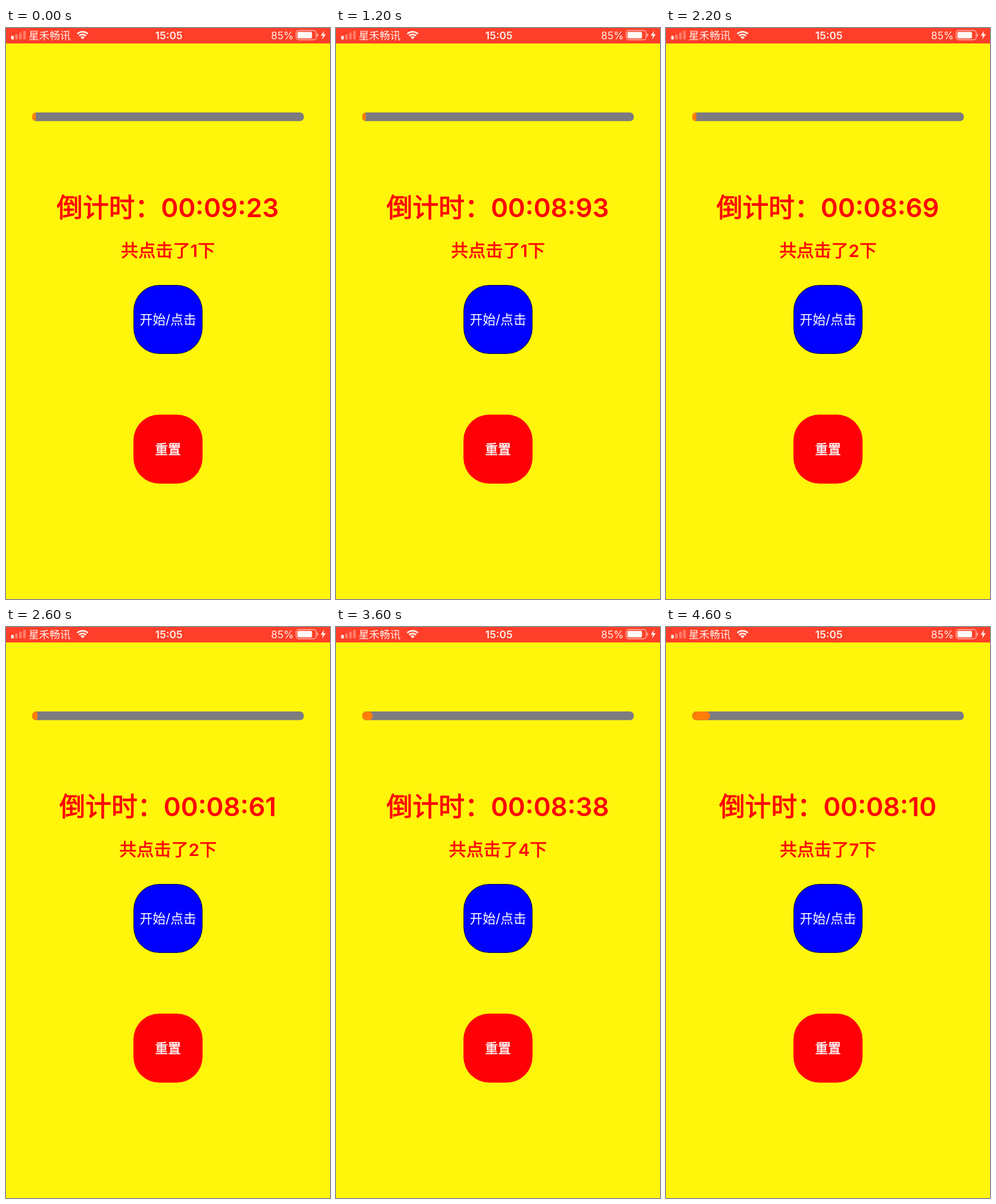
An HTML page with a canvas for the animation above (4800 ms loop, 544x960 px).

```html
<!DOCTYPE html>
<html lang="zh-CN">
<head>
<meta charset="utf-8">
<title>倒计时</title>
<style>
html, body { margin: 0; width: 100%; height: 100%; overflow: hidden; background: #fff60c; }
canvas { display: block; width: 544px; height: 960px; }
</style>
</head>
<body>
<canvas id="stage" width="544" height="960"></canvas>
<script>
const ctx = document.getElementById('stage').getContext('2d');
const LOOP = 4800, STEP = 200;
const CJK = '"Noto Sans CJK SC", "Noto Sans CJK", sans-serif';
const LATIN = 'Inter, sans-serif';
const PALE = '#fff0ea';

// [time, value] knots
const clock = [[0, 923], [600, 906], [1200, 893], [2200, 869], [3000, 853], [4200, 823], [4600, 810]];
const fill = [[0, 6], [2000, 6], [2200, 7], [3000, 11], [4200, 24], [4600, 30]];
const taps = [2000, 2800, 3400, 4000, 4400, 4600];

function lerpAt(knots, t) {
  for (let i = 1; i < knots.length; i++) {
    const [t0, v0] = knots[i - 1], [t1, v1] = knots[i];
    if (t <= t1) return v0 + (v1 - v0) * (t - t0) / (t1 - t0);
  }
  return knots[knots.length - 1][1];
}

function box(x, y, w, h, r, color) {
  ctx.fillStyle = color;
  ctx.beginPath();
  ctx.roundRect(x, y, w, h, r);
  ctx.fill();
}

// bold is an outline width in em, giving a medium weight between the installed ones
const cjk = (text, bold = 0) => ({ text, bold, weight: 400, family: CJK });
const latin = (text, weight = 400) => ({ text, bold: 0, weight, family: LATIN });

// Draws mixed-font runs on one baseline; centred on x unless left is set.
function line(runs, x, y, size, color, left = false) {
  const setFont = r => { ctx.font = `${r.weight} ${size}px ${r.family}`; };
  const widths = runs.map(r => { setFont(r); return ctx.measureText(r.text).width; });
  if (!left) x -= widths.reduce((a, b) => a + b, 0) / 2;
  ctx.fillStyle = ctx.strokeStyle = color;
  ctx.lineJoin = 'round';
  runs.forEach((r, i) => {
    setFont(r);
    ctx.fillText(r.text, x, y);
    if (r.bold) {
      ctx.lineWidth = r.bold * size;
      ctx.strokeText(r.text, x, y);
    }
    x += widths[i];
  });
}

function wifi(x, y) {
  const a = -Math.PI * 0.75, b = -Math.PI * 0.25;
  ctx.strokeStyle = ctx.fillStyle = PALE;
  ctx.lineWidth = 2.8;
  for (const r of [8.2, 12.6]) {
    ctx.beginPath();
    ctx.arc(x, y, r, a, b);
    ctx.stroke();
  }
  ctx.beginPath();
  ctx.moveTo(x, y);
  ctx.arc(x, y, 5, a, b);
  ctx.fill();
}

function battery() {
  ctx.strokeStyle = '#ffb5a6';
  ctx.lineWidth = 1.4;
  ctx.beginPath();
  ctx.roundRect(487.2, 4.3, 33.6, 15.4, 4);
  ctx.stroke();
  box(489.3, 6.4, 24.5, 11.2, 2, '#fffaf6');
  box(522.2, 9.5, 1.8, 5, 1, '#ffb5a6');
  ctx.fillStyle = PALE;
  ctx.beginPath();
  [[534, 4.5], [528.5, 13], [532, 13], [530.5, 19.5], [537, 10.5], [533.2, 10.5]]
    .forEach(p => ctx.lineTo(...p));
  ctx.fill();
}

function statusBar() {
  box(0, 0, 544, 26, 0, '#ff3f29');
  [6, 8.5, 11.5, 14.5].forEach((h, i) =>
    box(8.7 + i * 6.7, 19.3 - h, 4.4, h, 1, i ? '#ff7b69' : PALE));
  line([cjk('星禾畅讯')], 38, 18.8, 17.6, PALE, true);
  wifi(128.6, 19);
  line([latin('15:05', 600)], 273.5, 18.7, 17.5, PALE);
  line([latin('85%')], 464, 18.7, 17.3, PALE);
  battery();
}

function progress(w) {
  ctx.save();
  ctx.beginPath();
  ctx.roundRect(44, 142, 456, 14.7, 6.5);
  ctx.clip();
  box(44, 142, 456, 14.7, 0, '#7c7b80');
  box(44, 142, w, 14.7, Math.min(7, w / 2), '#ff7f08');
  ctx.restore();
}

function button(y, runs, color, rim = color) {
  box(214, y, 116, 116, 43.5, rim);
  box(215, y + 1, 114, 114, 42.5, color);
  line(runs, 272, y + 66.3, 21.75, '#fff');
}

function draw(t) {
  const left = Math.round(lerpAt(clock, t));
  const pad = n => String(n).padStart(2, '0');
  const time = `00:${pad(Math.floor(left / 100))}:${pad(left % 100)}`;
  const count = 1 + taps.filter(s => t >= s).length;

  box(0, 0, 544, 960, 0, '#fff60c');
  statusBar();
  progress(lerpAt(fill, t));
  line([cjk('倒计时：', 0.024), latin(time, 600)], 271.6, 318, 43.8, '#ff0006');
  line([cjk('共点击了', 0.024), latin(count, 600), cjk('下', 0.024)], 272, 385, 29.1, '#ff0006');
  button(432, [cjk('开始'), latin('/'), cjk('点击')], '#0000ff', '#0a0a3a');
  button(650, [cjk('重置', 0.02)], '#fe0006');
}

const start = performance.now();
function frame(now) {
  const t = Math.max(0, now - start) % LOOP;
  draw(Math.floor(t / STEP) * STEP);
  requestAnimationFrame(frame);
}
draw(0);
requestAnimationFrame(frame);
</script>
</body>
</html>
```
